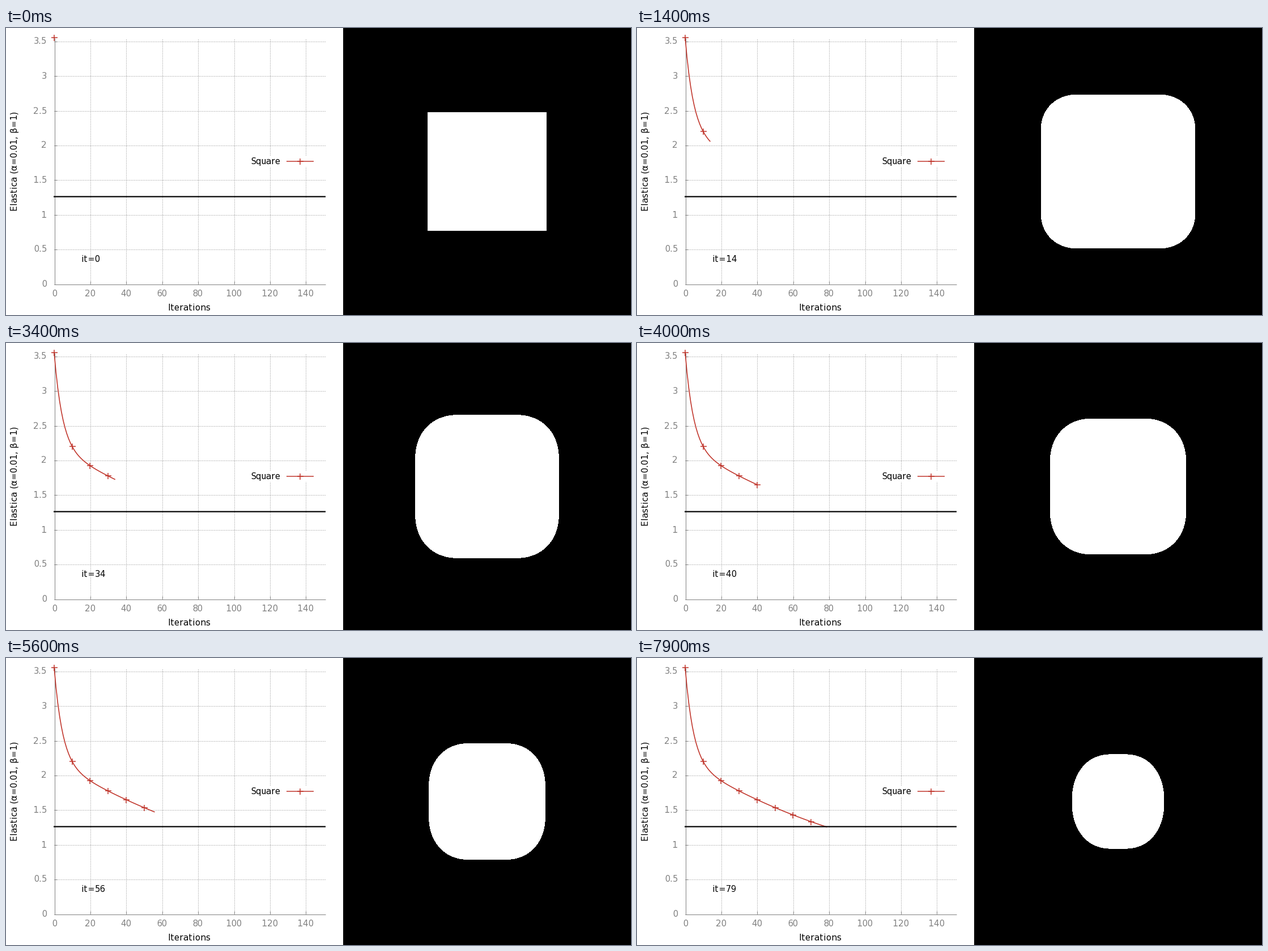
Write a matplotlib script that moves like this. It is 1103 px wide and 508 px high and loops after 8 s.

```python
import numpy as np
import matplotlib.pyplot as plt
from matplotlib.animation import FuncAnimation
from matplotlib.patches import Polygon, Rectangle

plt.rcParams["font.family"] = "DejaVu Sans"
plt.rcParams["text.hinting_factor"] = 1  # whole-pixel glyph advances

W, H, DPI = 1103, 508, 100
PX = 72 / DPI
FRAMES = 80
RED, GREY = "#c0342a", "#808080"
LEFT, RIGHT, TOP, BASE = 85, 563.5, 17.5, 453
CX, CY = 849, 254

fig = plt.figure(figsize=(W / DPI, H / DPI), dpi=DPI, facecolor="white")
ax = fig.add_axes([0, 0, 1, 1])
ax.set_xlim(0, W)
ax.set_ylim(H, 0)
ax.axis("off")


def plot_x(it):
    return LEFT + 3.17 * it


def line(xs, ys, color, width=1.0, **kw):
    kw.setdefault("solid_capstyle", "butt")
    return ax.plot(xs, ys, color=color, lw=width * PX, **kw)[0]


def label(x, y, s, color="black", ha="left", **kw):
    return ax.text(x, y, s, color=color, ha=ha, va="baseline",
                   fontsize=15 * PX, **kw)


def crosses(xs, ys, **kw):
    return ax.plot(xs, ys, ls="none", marker="+", ms=11 * PX, snap=False,
                   mew=1.5 * PX, color=RED, **kw)[0]


# Chart: grid, ticks, axes
DOTS = dict(ls=(0, (1, 2)), dash_capstyle="butt", zorder=1)
for k in range(8):
    x = int(plot_x(20 * k)) + 0.5
    y = int(BASE - 61.43 * k + 0.2) + 0.5
    if k:
        line([x, x], [BASE, TOP], GREY, **DOTS)
        line([LEFT, RIGHT], [y, y], GREY, **DOTS)
    line([x, x], [BASE, BASE - 5], GREY)
    line([LEFT, LEFT + 5], [y, y], GREY)
    label(x, 475, str(20 * k), GREY, "center")
    label(72, y + 5, f"{k / 2:g}", GREY, "right")
line([LEFT + 0.5] * 2, [TOP, BASE + 1], GREY)
line([LEFT, RIGHT], [BASE + 0.5] * 2, GREY)

label(323, 500, "Iterations", ha="center")
label(20.5, 235.5, "Elastica (α=0.01, β=1)", ha="center",
      rotation=90, rotation_mode="anchor")

# Legend
ax.add_patch(Rectangle((428, 226), 120, 20, color="white", lw=0, zorder=1.5))
label(484, 241, "Square", ha="right")
line([495, 543], [236, 236], RED, 1.5, snap=False)
crosses([519], [236])

# Energy as a pixel row: fast decay onto a slowly flattening slope
steps = np.arange(FRAMES)
energy = (183.5 + 1.9 * steps - 0.0055 * steps ** 2
          - 166.5 * np.exp(-steps / 4.6))

curve = line([], [], RED, 1.6, zorder=3)
marks = crosses([], [], zorder=3)
line([84, 564], [298.5, 298.5], "black", 2.2, zorder=4, snap=False)
counter = label(132, 414, "")

# Shape panel
ax.add_patch(Rectangle((595, 0), W - 595, H, color="black", lw=0))
blob = ax.add_patch(Polygon(np.zeros((3, 2)), closed=True, fc="white",
                            ec="none", antialiased=False, zorder=3))

deg = np.linspace(0, 90, 91)
cos, sin = np.cos(np.radians(deg)), np.sin(np.radians(deg))
POWER = 2.2
ROUND = (cos ** POWER + sin ** POWER) ** (-1 / POWER)


def outline(it):
    """Square with superelliptic corners, mirrored from one quadrant."""
    # grow, rest, then shrink; the height lags a little at the end
    w = np.interp(it, [0, 14, 20, 27, 56, 79],
                  [105.4, 136, 136, 134, 102.5, 81])
    h = w + 0.1 * max(0, it - 58)
    decay = np.exp(-it / 6)
    flat_x = 78.4 - 0.84 * it + 27 * decay
    flat_y = 83 - 1.05 * it + 22.4 * decay
    # a sharp corner tip that soon fades
    tip = 0.16 * max(0, 1 - it / 14) * np.exp(-abs(deg - 37) / 8)
    r = ROUND * (1 + tip)
    x = np.minimum(flat_x + (w - flat_x) * r * cos, w)
    y = np.minimum(flat_y + (h - flat_y) * r * sin, h)
    x = np.concatenate([x, -x[::-1], -x, x[::-1]])
    y = np.concatenate([y, y[::-1], -y, -y[::-1]])
    return np.column_stack([CX + x, CY + y])


def draw(it):
    n = it + 1
    curve.set_data(plot_x(steps[:n]), energy[:n])
    marks.set_data(plot_x(steps[:n:10]), energy[:n:10])
    counter.set_text(f"it={it}")
    blob.set_xy(outline(it))
    return curve, marks, counter, blob


anim = FuncAnimation(fig, draw, frames=FRAMES, interval=100, repeat=True,
                     repeat_delay=0, init_func=lambda: draw(0))
plt.show()
```
